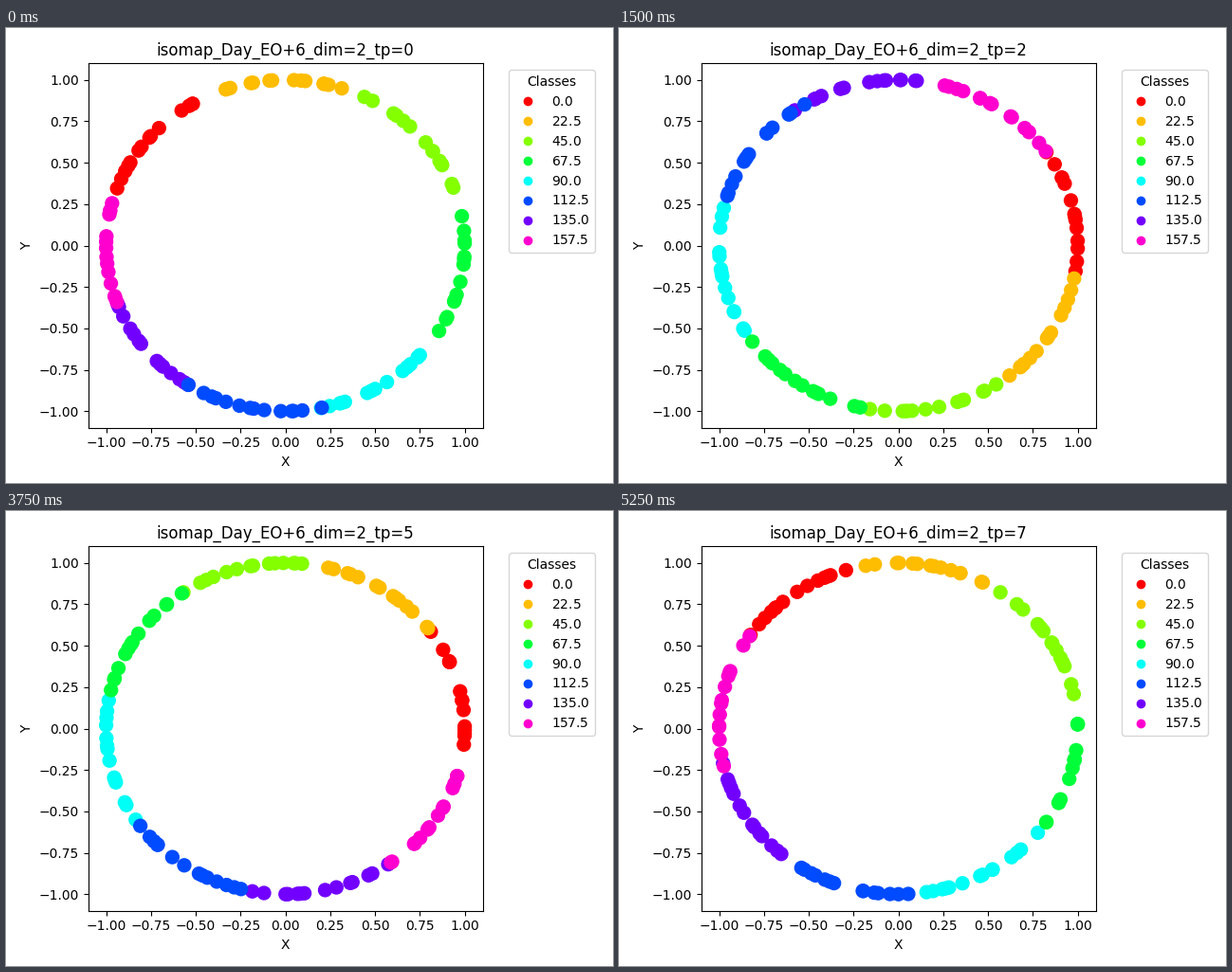
A matplotlib script for the animation above (6000 ms loop, 640x480 px).

```python
import numpy as np
import matplotlib.pyplot as plt
from matplotlib.animation import FuncAnimation

CLASSES = np.arange(8) * 22.5
DRAW_ORDER = [0, 2, 4, 6, 1, 3, 5, 7]
DOTS = 14      # per class
SPREAD = 20    # half width of a class on the ring, in degrees

# For each step: angle of the first class, sense of rotation, and how far
# the classes opposite to it drift, in degrees.
STEPS = [(140, -1, -20), (21, 1, -8), (13, -1, -3), (66, 1, -11),
         (40, 1, -5), (12, 1, -1), (60, -1, -5), (126, -1, -8)]


def ring_angles(tp):
    """Angles in radians, one row per class in drawing order."""
    start, turn, drift = STEPS[tp]
    rng = np.random.default_rng(tp)
    phase = 2 * CLASSES[DRAW_ORDER]
    centre = start + turn * phase + drift * np.sin(np.radians(phase / 2)) ** 2
    jitter = rng.uniform(-4, 4, (len(CLASSES), DOTS))
    fan = np.linspace(-SPREAD, SPREAD, DOTS)
    return np.radians(centre[:, None] + fan + jitter)


fig = plt.figure(figsize=(6.4, 4.8), dpi=100)
ax = fig.add_subplot()


def draw(tp):
    ax.clear()
    angles = ring_angles(tp).ravel()
    labels = np.repeat(CLASSES[DRAW_ORDER], DOTS)
    dots = ax.scatter(np.cos(angles), np.sin(angles), c=labels, s=100,
                      cmap="hsv", vmin=0, vmax=180)
    ax.set(xlim=(-1.1, 1.1), ylim=(-1.1, 1.1), xlabel="X", ylabel="Y",
           title=f"isomap_Day_EO+6_dim=2_tp={tp}")
    ax.legend(*dots.legend_elements(), title="Classes",
              bbox_to_anchor=(1.05, 1), loc="upper left")


draw(0)
fig.tight_layout()
anim = FuncAnimation(fig, draw, frames=len(STEPS), interval=750, repeat=True)
plt.show()
```
